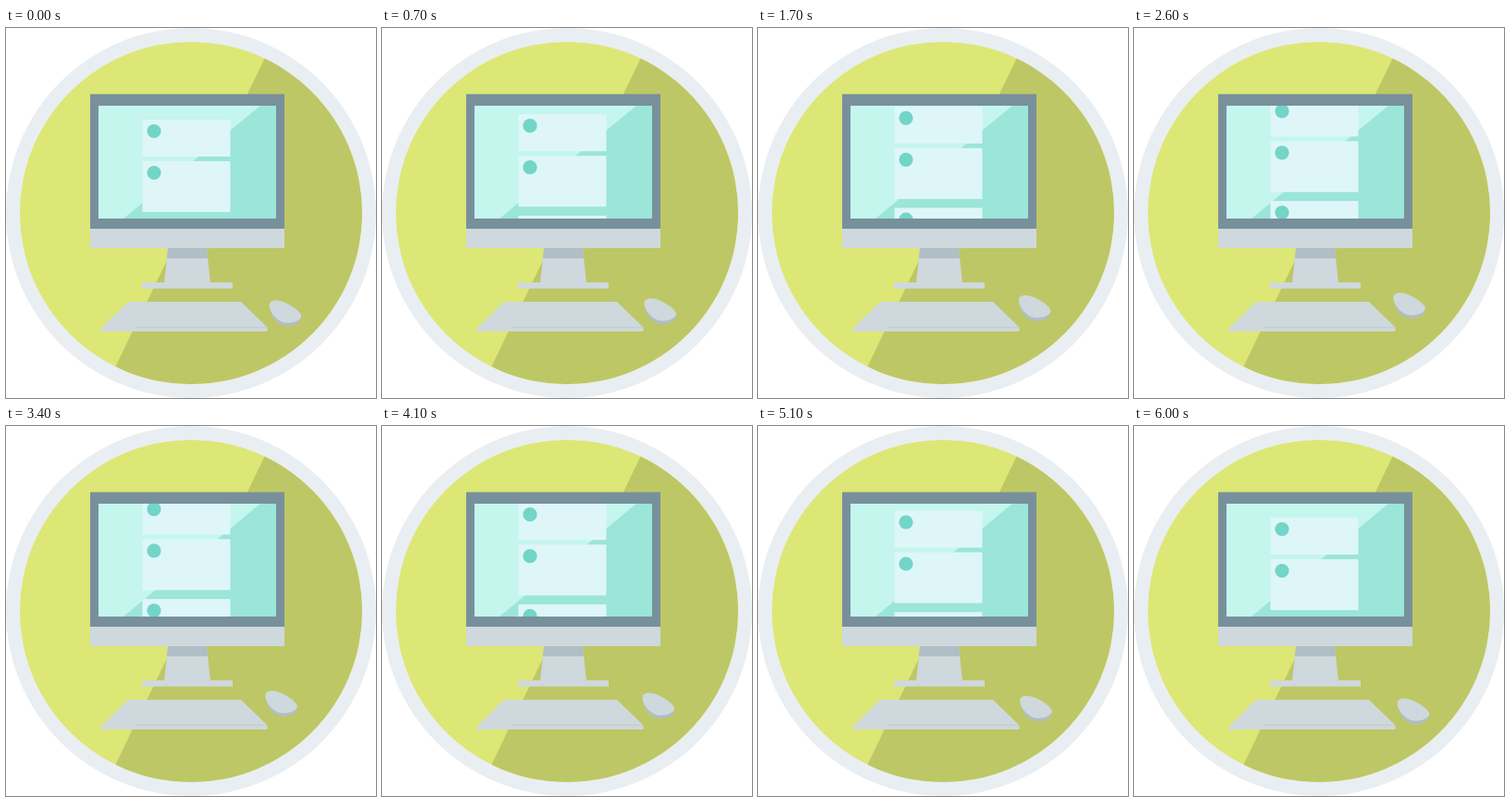
An HTML page for the animation above (6.1 s loop, 400 by 400 pixels).

```html
<!DOCTYPE html>
<html lang="en">
<head>
<meta charset="utf-8">
<title>Scrolling desktop</title>
<style>
  html, body { margin: 0; width: 100%; height: 100%; overflow: hidden; background: #fff; }
  svg { display: block; width: 100%; height: 100%; }
</style>
</head>
<body>
<svg viewBox="0 0 400 400">
  <defs>
    <clipPath id="disc"><circle cx="200" cy="200" r="185"/></clipPath>
    <clipPath id="screen"><rect x="100" y="84" width="192" height="122"/></clipPath>
  </defs>

  <circle cx="200" cy="200" r="200" fill="#e9eef2"/>
  <g clip-path="url(#disc)">
    <rect width="400" height="400" fill="#dce775"/>
    <path d="M295.5 0H400V400H102Z" fill="#bec765"/>
  </g>

  <path d="M175 238H217L221 276H171Z" fill="#cfd8dc"/>
  <path d="M175 238H217L218.2 249H173.8Z" fill="#b0bec5"/>
  <rect x="147" y="275" width="98" height="6.7" fill="#cfd8dc"/>
  <rect x="91" y="71.5" width="210" height="146" fill="#78909c"/>
  <rect x="91" y="217" width="210" height="21" fill="#cfd8dc"/>

  <g clip-path="url(#screen)">
    <rect x="100" y="84" width="192" height="122" fill="#c4f6ee"/>
    <path d="M275 84H292V206H127Z" fill="#9be5d9"/>
    <g id="feed"></g>
  </g>

  <path d="M132 296H254L282.5 323.5V328H102V325.5Z" fill="#cfd8dc"/>
  <path d="M139 323.6H282.5" stroke="#bcc8ce" stroke-width=".8"/>

  <g id="mouse">
    <path d="M285 299C285 307 288 314 293 318C298 322 304 323 310 321.5C316 320 319.5 317 319.3 311Z" fill="#b0bec5"/>
    <path d="M286 296.5C289 293.5 296 294 303 297.5C311 301.5 319 307 319.3 311.5C319 316 311 318.8 304 318.8C294 318.5 285 308 284.7 300C284.6 298.5 285 297.3 286 296.5Z" fill="#cfd8dc"/>
  </g>
</svg>
<script>
  const LOOP = 6100, STEP = 100, TURN = 3000, TRAVEL = 25;
  const feed = document.getElementById('feed');
  const mouse = document.getElementById('mouse');

  function add(tag, attrs) {
    const el = document.createElementNS('http://www.w3.org/2000/svg', tag);
    for (const key in attrs) el.setAttribute(key, attrs[key]);
    feed.appendChild(el);
  }

  function card(y, height) {
    add('rect', { x: 147.5, y, width: 95, height, fill: '#def6f8' });
    add('circle', { cx: 160, cy: y + 12.5, r: 7.6, fill: '#72d5c8' });
  }

  card(99, 40);
  card(144, 55);
  card(208.7, 40);

  function draw(ms) {
    const t = Math.floor((ms % LOOP) / STEP) * STEP;
    const p = 1 - Math.abs(t - TURN) / TURN;
    feed.setAttribute('transform', `translate(0 ${-TRAVEL * p})`);
    mouse.setAttribute('transform', `translate(${-5 * p} ${-9.6 * p})`);
  }

  const start = performance.now();
  function tick() {
    draw(performance.now() - start);
    requestAnimationFrame(tick);
  }
  tick();
</script>
</body>
</html>
```
